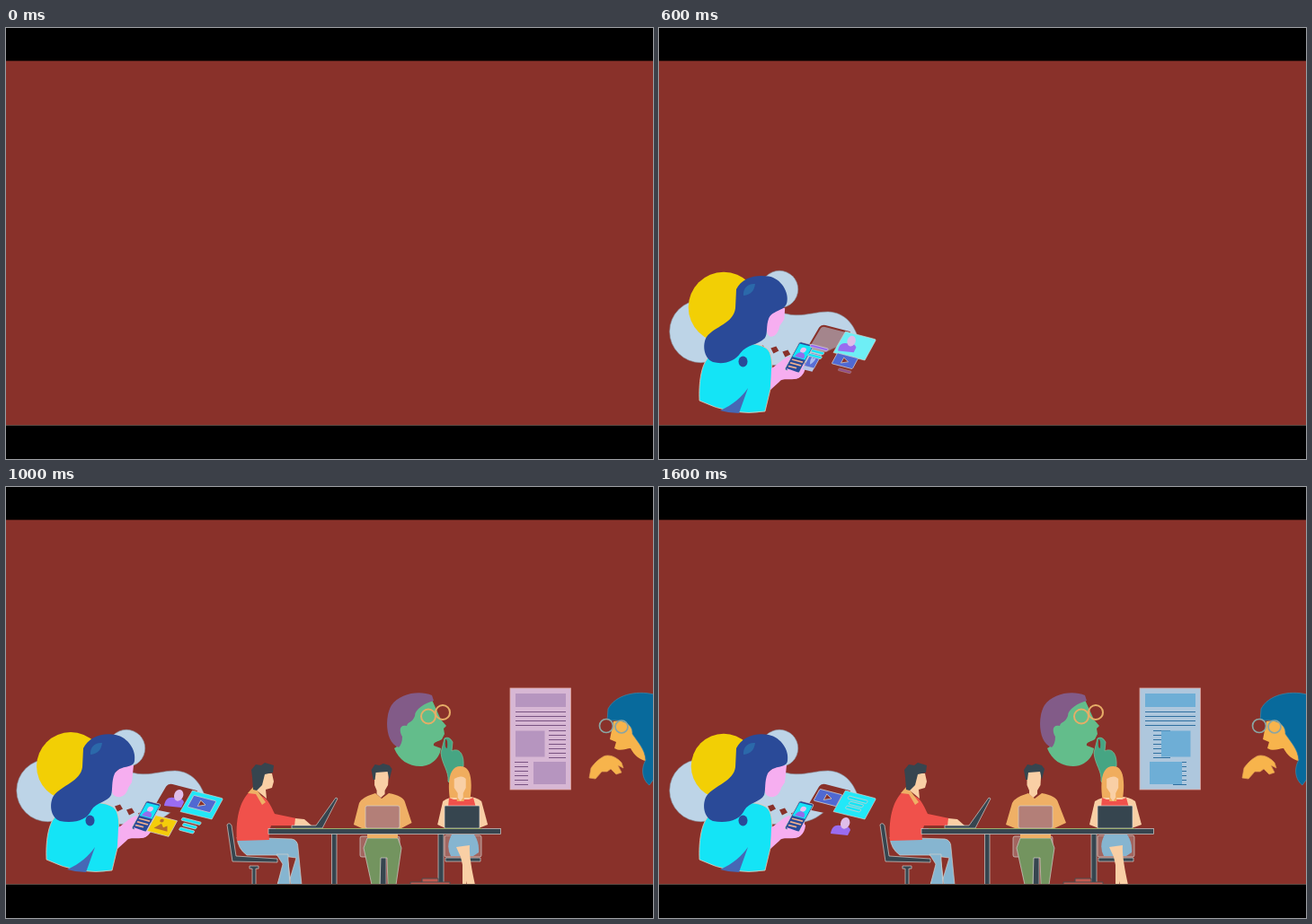
Write an HTML page that moves like this. It is 720 px wide and 480 px high and loops after 1.7 s.

```html
<!DOCTYPE html>
<html lang="en">
<head>
<meta charset="utf-8">
<title>People at work</title>
<style>
html, body { margin: 0; width: 100%; height: 100%; overflow: hidden; background: #000; }
svg { display: block; width: 720px; height: 480px; }
.dark { fill: #36454f; }
.skin { fill: #f9cfa5; }
.red { fill: #f0514b; }
.jeans { fill: #86b5d0; }
.seat { fill: #a2655f; }
.navy { fill: #2a4a98; }
.pink { fill: #f6aef0; }
.cyan { fill: #14e4f6; }
.edge { stroke: #d3d0cc; stroke-width: .7; }
.bg { fill: #89312a; }
</style>
</head>
<body>
<svg viewBox="0 0 720 480">
  <rect width="720" height="480"/>
  <rect class="bg" y="36.600" width="720" height="406.400"/>

  <g id="reader">
    <g fill="#bdd4e7" stroke="#8d9aa6" stroke-width=".6">
      <circle cx="46.5" cy="338" r="34.7"/>
      <circle cx="134" cy="291" r="20.7"/>
      <path d="M100 318H140C158 323 172 316 188 316C208 317 217 331 222 346C206 352 190 357 178 366C164 376 140 377 105 374Z"/>
    </g>
    <circle id="sun" cx="72" cy="311" fill="#f2cf05"/>
    <g id="gems" class="bg"></g>
    <path class="cyan" stroke="#f3c5ae" stroke-width=".8" d="M45 415C44 395 47 376 54 368C72 352 108 346 121 358C128 365 126 390 124 402L118 427Q82 433 45 415Z"/>
    <path fill="#4668b5" d="M68 426C82 420 92 411 99 401L89 429Q78 429 68 426Z"/>
    <path id="face" class="pink"/>
    <path id="hair" class="navy"/>
    <path fill="#2b69aa" d="M94 298C93 290 99 284 107 285C106 292 103 297 94 298Z"/>
    <ellipse class="navy" cx="93.500" cy="371.500" rx="5" ry="6"/>
    <path class="pink" d="M125 379C131 376 137 368 145 366L150 372L160 370C164 376 162 386 155 390C147 393 137 389 134 394L124 403Z"/>
    <path id="frame" class="bg" stroke="#89312a" stroke-width="2" stroke-linejoin="round" d="M165 358L179 334Q181 331 185 332L212 339L194 364Z"/>
    <g transform="matrix(1 .26 -.5 .92 156 367)">
      <rect class="navy edge" x="-8" y="-17" width="16" height="34" rx="2"/>
      <rect class="cyan" x="-7" y="-15" width="14" height="16"/>
      <circle cx="0" cy="-9" r="3" fill="#e7bff0"/>
      <path fill="#946cec" d="M-5 0Q-4-6 0-6Q5-6 5 0Z"/>
      <path stroke="#f3b18e" stroke-width="1.6" d="M-6 4H6M-6 8H6M-6 12H3"/>
    </g>
    <path class="pink" d="M142 379L156 384L161 374L163 377C162 387 156 391 148 391Z"/>
    <path id="panel" class="edge" d="M207.5 338L240 346.500Q242 347 240.500 349L229 370L194 361.500Z"/>
    <g id="heart">
      <rect fill="#b7c5e6" x="-11" y="-7" width="23" height="18"/>
      <rect class="edge" fill="#5a6fd6" x="-11" y="-9" width="23" height="16"/>
      <path fill="#a8bdf0" d="M0 4C-8-2-4-7 0-3C4-7 8-2 0 4Z"/>
    </g>
    <g id="photo">
      <rect class="edge" fill="#f4cd0a" x="-12" y="-9" width="24" height="19"/>
      <path fill="#b76e2c" d="M-7 5L-2-2L2 2L5-1L8 5Z"/>
      <circle cx="-3" cy="-5" r="2" fill="#b76e2c"/>
    </g>
    <g id="video">
      <rect class="edge" fill="#5069d2" x="-12.500" y="-7" width="25" height="14" rx="1"/>
      <path class="bg edge" d="M-3-3.500L4 0L-3 3.500Z"/>
      <rect id="caption" class="edge" fill="#9a6cf0" x="-2" y="10" width="15" height="3" rx="1"/>
    </g>
    <g id="bars" class="edge">
      <rect id="bar" x="-10" y="-7" width="21" height="3.400" rx="1"/>
      <rect class="cyan" x="-6" y="-1.500" width="15" height="3.400" rx="1"/>
      <rect class="cyan" x="-7" y="4" width="16" height="3.400" rx="1"/>
    </g>
    <g id="person">
      <path fill="#9a6cf0" d="M-12 9C-11 2-7-1-2 0C4-1 9 1 10 5L7 11Z"/>
      <ellipse cx="3" cy="-4" rx="5" ry="6.500" fill="#dfbde9" transform="rotate(20)"/>
    </g>
  </g>

  <g id="talk">
    <path fill="#63bd8b" d="M474 237L479 248L484 259L490 266L487 269L488 275L485 281C480 284 475 284 476 288L484 291C483 301 474 311 461 311C448 311 437 304 432 291C440 287 440 280 438 275C436 264 442 260 447 263L455 246Z"/>
    <path fill="#825b88" d="M437 290C422 285 421 256 429 243C438 230 460 226 474 232L476 238C466 241 455 247 455 255C452 263 447 261 446 266C438 264 437 271 441 278Q441 286 437 290Z"/>
    <path fill="#46a583" stroke="#79c79f" stroke-width=".7" d="M484 296L488 280Q493 277 497 284L496 294C504 290 510 297 509 311L497 333L492 328C493 316 485 309 484 296Z"/>
    <path class="bg" d="M489 281Q492 280 491 291Q488 291 489 281Z"/>
    <g fill="none" stroke="#e6ad67" stroke-width="2">
      <circle cx="470" cy="255.500" r="8"/>
      <circle cx="486" cy="251" r="8"/>
    </g>
    <g id="page">
      <rect id="sheet" y="224" width="67.500" height="113" stroke="#dfa49c" stroke-width=".8"/>
      <rect class="block" x="6" y="230" width="56" height="15"/>
      <path class="line" d="M6 250.500H62M6 255.500H62M6 260.500H62M6 265.500H62"/>
      <path class="line" id="notesA"/>
      <path class="line" id="notesB"/>
      <rect class="block" id="blockA" y="271.500" width="32.500" height="29"/>
      <rect class="block" id="blockB" y="306" width="36" height="25"/>
    </g>
    <path fill="#f7b44c" d="M676 261L672 281L679 284L677 291C684 295 690 291 695 291C699 299 706 304 712 305L707 277C700 264 690 258 676 261Z"/>
    <path fill="#086a9c" stroke="#3f89a8" stroke-width=".7" d="M721 231C700 226 678 232 670 247L669 261C684 257 698 263 697 275C703 284 711 292 712 304C705 316 710 328 716 332L721 325Z"/>
    <path fill="#f7b44c" stroke="#dd9a52" stroke-width=".7" d="M649 324L651 313C656 306 660 303 665 300C671 297 680 301 685 307L687 313L681 310L685 318L679 320L673 314L669 317L663 317L656 325Z"/>
    <g fill="none" stroke="#8aa5a3" stroke-width="1.700">
      <circle class="bg" cx="668" cy="266" r="7.500"/>
      <circle cx="685" cy="267" r="7"/>
    </g>
  </g>

  <g id="team">
    <g class="edge">
      <path class="jeans" d="M257 390L318 392Q325 393 325 402L329 443H317L313 410L302 443H314L323 413L300 410H268Q258 403 257 390Z"/>
      <path class="jeans" d="M301 409H314V416L316 443H302L308 420Z"/>
      <path class="dark" d="M246 376Q249 373 251 377L256 411L302 414V418L252 417Z"/>
      <path class="dark" d="M271 422H281V425H278V443H274V425H271Z"/>
    </g>
    <path class="red" d="M273 338C262 346 255 366 257 394L293 393C292 387 294 380 295 377L321 377L323 369L299 364C295 356 292 348 286 345Z"/>
    <path fill="#efb066" d="M269 341L276 333L289 351L285 354L278 342Z"/>
    <path class="skin" d="M322 369L332 370L340 377H321Z"/>
    <path class="skin" d="M284 319H296L298 328L296 335L289 337L290 347L278 337Z"/>
    <path class="dark" d="M275 337L274 323L273 315L278 309L284 310L288 307L298 310L297 318L288 320L285 332L279 338Z"/>
    <path class="dark edge" d="M318 377H345L367 346L369 347L352 380H318Z"/>

    <g class="edge">
      <rect class="seat" x="394" y="389" width="44" height="23" rx="2"/>
      <path class="dark" d="M416 410H423V443H416Z"/>
      <path fill="#73945f" d="M402 391H436L440 402L434 443H425L424 413H417L416 443H407L398 402Z"/>
      <rect fill="#efb066" x="402" y="386" width="34" height="5" stroke="none"/>
      <rect class="seat" x="488" y="388" width="41" height="24" rx="2"/>
      <path class="dark" d="M489 413H528V417H489Z"/>
    </g>
    <path class="jeans" d="M496 387H521Q527 396 526 407L520 411H495Q489 400 496 387Z"/>
    <path class="skin" d="M501 401L516 399Q515 412 522 443H513L506 412Z"/>
    <path class="skin" d="M508 402L515 401L512 443H508Z"/>

    <path id="shirt" fill="#efb066"/>
    <g id="manHead">
      <path class="skin" d="M411.500 316H427.500L426.500 332L423 338V342L418.500 346L414 342V338L411.500 332Z"/>
      <path class="dark" d="M410 326L408 315L412 309L417 310L421 308L428 310L431 314L428 326L426 317L413 318L412 326Z"/>
    </g>
    <path id="arms" class="skin"/>
    <path class="red" d="M493 346L498 348H515L520 346L523 357H492Z"/>
    <g id="girlHead">
      <path fill="#f0ad5e" d="M495 346C492 322 497 311 507 311C517 311 521 322 518 346H511V350H503V346Z"/>
      <path class="skin" d="M500 325Q508 320 513 325V335L510 341V346L507 350L504 346V341L500 335Z"/>
    </g>
    <rect class="edge" fill="#b37f78" x="400" y="355" width="38" height="25" rx="2"/>
    <rect class="dark edge" x="488" y="355" width="39" height="25" rx="1"/>
    <path class="dark edge" d="M362.500 386H368V443H362.500ZM481 386H487V443H481Z"/>
    <rect class="dark edge" x="292" y="380.500" width="258.500" height="6"/>
    <path stroke="#9db06e" stroke-width="1" d="M300 380.500H530"/>
    <path fill="#c35a50" stroke="#4b4a4d" d="M450 443V440H494V443M463 440V436H481V440"/>
  </g>
  <rect y="443" width="720" height="37"/>
  <path stroke="#5a4a44" d="M0 442.500H720"/>
</svg>
<script>
const LOOP = 1700, STEP = 100;
const $ = id => document.getElementById(id);
const set = (id, name, value) => $(id).setAttribute(name, value);
const clamp = x => Math.max(0, Math.min(1, x));
const ease = x => (x = clamp(x), x * x * (3 - 2 * x));
const mix = (a, b, k) => a + (b - a) * k;

const HAIR = [
  "M86 291C92 278 108 275 122 277C136 279 145 296 142 306C139 317 127 317 123 326C120 334 123 343 118 347C108 355 96 353 88 363C80 373 68 375 60 372C50 368 48 352 53 344C62 332 83 330 85 312Z",
  "M86 291C92 278 108 273 122 276C136 279 145 293 143 305C142 314 127 309 121 319C117 328 119 337 117 343C113 351 100 351 95 360C90 371 76 375 60 372C49 368 48 352 53 344C62 332 83 328 85 312Z"
];
const FACE = [
  "M139 313C130 315 122 321 121 331C121 337 122 342 125 343C130 343 132 336 133 330L139 321Z",
  "M142 310C132 309 121 314 118 325C117 335 117 342 121 344C129 348 135 341 136 335L140 329L139 323Z"
];
const TONES = {
  sheet: [[215, 183, 212], [195, 177, 201], [174, 199, 221]],
  block: [[182, 149, 191], [160, 159, 201], [110, 174, 214]],
  line: [[121, 82, 130], [88, 99, 148], [48, 112, 160]]
};

function morph([a, b], k) {
  const to = b.match(/\d+/g);
  let i = 0;
  return a.replace(/\d+/g, n => mix(+n, +to[i++], k).toFixed(2));
}

function tone(name, t) {
  const [a, b, c] = TONES[name], late = t > 1300;
  const k = clamp((t - (late ? 1300 : 1000)) / 300);
  return `rgb(${a.map((v, i) => Math.round(late ? mix(b[i], c[i], k) : mix(v, b[i], k)))})`;
}

// Three resting places; the second leg swings past the phone.
const SLOTS = [[218, 353], [188, 346], [203, 377]];
function slot(s) {
  s %= 3;
  const i = Math.floor(s), k = s - i, a = SLOTS[i], b = SLOTS[(i + 1) % 3];
  return a.map((v, j) => {
    const c = i === 1 ? [152, 378][j] : (v + b[j]) / 2;
    return mix(mix(v, c, k), mix(c, b[j], k), k);
  });
}
const tilt = (x, y, size = 1) => `matrix(1 .26 -.5 .92 ${x} ${y}) scale(${size})`;

// A card that slides out of the phone as it widens.
function card(id, wide, x, y) {
  set(id, "display", wide > 0 ? "inline" : "none");
  set(id, "transform", tilt(mix(163, x, wide), mix(375, y, wide)) + ` scale(${wide} 1)`);
}

function drawReader(t) {
  const m = ease((t - 400) / 600) + ease((t - 1000) / 600);
  const mid = 1 - Math.abs(1 - 2 * (m % 1));
  const size = 1 - .15 * mid;
  const turn = clamp((t - 400) / 500);
  set("sun", "r", 37.5 + 2 * Math.cos(2 * Math.PI * (t - 700) / 1400));
  set("hair", "d", morph(HAIR, turn));
  set("face", "d", morph(FACE, turn));
  set("frame", "fill-opacity", 1 - mid);
  set("panel", "fill", `rgb(${mix(34, 180, mid)},${mix(232, 244, mid)},${mix(248, 243, mid)})`);

  let gems = "";
  for (let i = -1; i < 3; i++) {
    const x = 125 + 13 * (i + m % 1), y = 357.5 + (x - 125) * .3;
    const r = clamp((x - 112) / 12);
    gems += `<path transform="translate(${x} ${y}) scale(${r})" d="M-4-2L2-4L5 1L-1 4Z"/>`;
  }
  $("gems").innerHTML = gems;

  set("person", "transform", `translate(${slot(m)}) scale(${size})`);
  set("bars", "transform", tilt(...slot(m + 1), size));
  set("video", "transform", tilt(...slot(m + 2), size));
  set("bar", "fill", m < .5 || mid > .5 ? "#9a6cf0" : "#14e4f6");
  set("caption", "opacity", clamp(1 - 2 * m));
  card("heart", 1 - 2 * m, 178, 367);
  const near = Math.abs(m - 1);
  card("photo", near <= .51 ? Math.max(.2, 1 - 2 * near) : 0, 174, 377);
}

function drawTeam(t) {
  const k = Math.sin(clamp((t - 700) / 600) * Math.PI / 2);
  const l = 389 - 3 * k, r = 448 + 5 * k;
  set("shirt", "d", `M${l} 376L393 352Q395 346 411 341L418 347L426 341Q442 344 444 351L${r} 374L440 380H396Z`);
  const a = 483 - 4 * k, b = 534 + 3 * k;
  set("arms", "d", `M${a} 376L${a + 6} 350Q493 345 502 345H514Q523 345 ${b - 7} 350L${b} 376L526 380H489Z`);
  set("manHead", "transform", `translate(${-2 * k})`);
  set("girlHead", "transform", `translate(${-1.8 * k})`);
}

function notes(x, w, y, n) {
  return Array.from({ length: n }, (_, i) => `M${x} ${y + 5 * i}h${w}`).join("");
}

function drawTalk(t) {
  const k = ((t - 867) ** 2 - 133 ** 2) / (733 ** 2 - 133 ** 2);
  set("page", "transform", `translate(${561 - 26 * k})`);
  set("sheet", "fill", tone("sheet", t));
  document.querySelectorAll(".block").forEach(e => e.setAttribute("fill", tone("block", t)));
  document.querySelectorAll(".line").forEach(e => e.setAttribute("stroke", tone("line", t)));
  set("notesA", "d", notes(43 - 28 * k, 19, 271.5, 7));
  set("notesB", "d", notes(5 + 32 * k, 15, 306.5, 6));
  set("blockA", "x", 6 + 18 * k);
  set("blockB", "x", 26 - 15 * k);
}

function draw(now) {
  const t = Math.floor(now % LOOP / STEP) * STEP;
  const parts = [["reader", 100, drawReader], ["team", 700, drawTeam], ["talk", 900, drawTalk]];
  for (const [id, from, paint] of parts) {
    set(id, "display", t >= from ? "inline" : "none");
    if (t >= from) paint(t);
  }
}

const start = performance.now();
function tick() {
  draw(performance.now() - start);
  requestAnimationFrame(tick);
}
tick();
</script>
</body>
</html>
```
